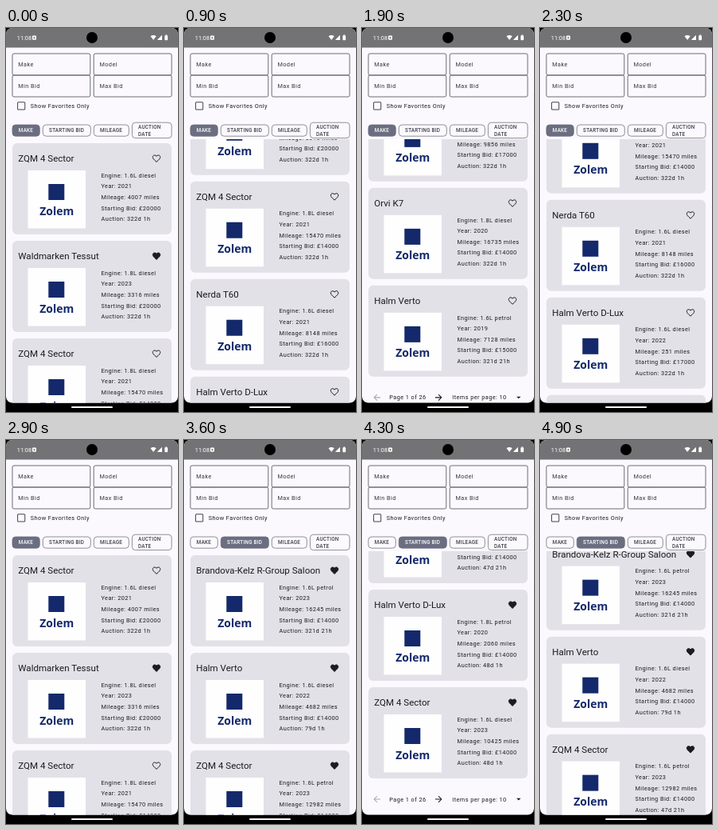
An HTML page for the animation above (5 s loop, 216 by 480 pixels).

```html
<!DOCTYPE html>
<html lang="en">
<head>
<meta charset="utf-8">
<title>Auction list</title>
<style>
html, body { margin: 0; width: 100%; height: 100%; overflow: hidden; background: #000; }
svg { display: block; width: 216px; height: 480px; font: 7.35px Roboto, sans-serif; letter-spacing: .42px; fill: #1c1b20; }
.title { font-size: 11.55px; letter-spacing: 0; }
.brand { font: bold 14px "Open Sans", sans-serif; letter-spacing: 0; fill: #14296b; }
.line { fill: none; stroke: #6c6d76; }
.chip text { font-size: 6.3px; font-weight: 500; letter-spacing: .26px; fill: #3c3d46; }
.chip rect { fill: none; stroke: #74757e; stroke-width: .8; }
.chip.on rect { fill: #6a6e80; stroke: #6a6e80; }
.chip.on text { fill: #fff; }
</style>
</head>
<body>
<svg id="stage" viewBox="0 0 216 480"></svg>
<script>
const PITCH = 122, TOP = 144, END = 933, LOOP = 5000, STEP = 100, SORT_AT = 3200;

// name, engine, year, miles, bid, time left, favourite
const byMake = [
  ["ZQM 4 Sector", "1.6L diesel", 2021, 4007, 20000, "322d 1h"],
  ["Waldmarken Tessut", "1.8L diesel", 2023, 3316, 20000, "322d 1h", 1],
  ["ZQM 4 Sector", "1.8L diesel", 2021, 15470, 14000, "322d 1h"],
  ["Nerda T60", "1.6L diesel", 2021, 8148, 16000, "322d 1h"],
  ["Halm Verto D-Lux", "1.6L diesel", 2022, 251, 17000, "322d 1h"],
  ["Nerda T60", "1.6L petrol", 2020, 6420, 15000, "322d 1h"],
  ["Halm Verto", "1.8L diesel", 2022, 11830, 16000, "322d 1h"],
  ["Waldmarken Tessut", "1.8L petrol", 2023, 9856, 17000, "322d 1h"],
  ["Orvi K7", "1.8L diesel", 2020, 16735, 14000, "322d 1h"],
  ["Halm Verto", "1.6L petrol", 2019, 7128, 15000, "321d 21h"]
];
const byBid = [
  ["Brandova-Kelz R-Group Saloon", "1.6L petrol", 2023, 16245, 14000, "321d 21h", 1],
  ["Halm Verto", "1.6L diesel", 2022, 4682, 14000, "79d 1h", 1],
  ["ZQM 4 Sector", "1.6L petrol", 2023, 12982, 14000, "47d 21h", 1],
  ["Orvi K7", "1.8L diesel", 2021, 9310, 14000, "47d 21h", 1],
  ["Nerda T60", "1.6L diesel", 2022, 5274, 14000, "47d 21h", 1],
  ["Waldmarken Tessut", "1.8L petrol", 2020, 13650, 14000, "47d 21h", 1],
  ["Halm Verto", "1.6L petrol", 2021, 7816, 14000, "47d 21h", 1],
  ["Orvi K7", "1.8L diesel", 2023, 3942, 14000, "47d 21h", 1],
  ["Halm Verto D-Lux", "1.8L petrol", 2020, 2060, 14000, "48d 1h", 1],
  ["ZQM 4 Sector", "1.6L diesel", 2023, 10425, 14000, "48d 1h", 1]
];

const text = (x, y, s, attrs = "") => `<text x="${x}" y="${y}" ${attrs}>${s}</text>`;
const rect = (x, y, w, h, r, attrs = "") =>
  `<rect x="${x}" y="${y}" width="${w}" height="${h}" rx="${r}" ${attrs}/>`;

const heart = full => `<path transform="translate(182.7 12.9) scale(.525)"
  d="M12 20C6.3 14.8 3 11.9 3 8.5C3 6 5 4 7.5 4C9.2 4 11 5 12 6.5C13 5 14.8 4 16.5 4C19 4 21 6 21 8.5C21 11.9 17.7 14.8 12 20Z"
  fill="${full ? "#1c1b20" : "none"}" stroke="#1c1b20" stroke-width="1.9"/>`;

function card([name, engine, year, miles, bid, left, fav], i) {
  const rows = [`Engine: ${engine}`, `Year: ${year}`, `Mileage: ${miles} miles`,
    `Starting Bid: £${bid}`, `Auction: ${left}`];
  return `<g transform="translate(0 ${TOP + i * PITCH})">
    ${rect(8, 0, 200, 114, 6, 'fill="#e2e1e8"')}
    ${text(15.3, 23, name, 'class="title"')}${heart(fav)}
    ${rect(27.5, 34, 72.5, 72.5, 0, 'fill="#fefefe"')}
    ${rect(53.3, 51, 20, 20, 0, 'fill="#14296b"')}
    ${text(63.8, 89.5, "Zolem", 'class="brand" text-anchor="middle"')}
    ${rows.map((s, k) => text(119.5, 42.7 + k * 13.6, s)).join("")}
  </g>`;
}

const arrow = (x, dir, color) => `<path transform="translate(${x} 0) scale(${dir} 1)"
  d="M-4 0H3.6M0 -3.8L3.8 0L0 3.8" fill="none" stroke="${color}" stroke-width="1.05"/>`;

const pager = `<g transform="translate(0 ${449 + END})">
  ${arrow(19, -1, "#a9a8ae")}${text(34.3, 2.6, "Page 1 of 26")}${arrow(96, 1, "#1c1b20")}
  ${text(113.3, 2.6, "Items per page: 10")}<path d="M194 -1.2h5.4l-2.7 2.7z"/></g>`;

const list = (id, cars) => `<g id="${id}">${cars.map(card).join("")}${pager}</g>`;

const field = (x, y, label) =>
  rect(x, y, 97.8, 27, 2, 'class="line"') +
  text(x + 7.2, y + 16.2, label, 'fill="#33343b"');

const chip = (id, x, w, label) =>
  `<g class="chip" id="${id}">${rect(x, 121, w, 14.2, 4)}${text(x + 7.8, 130.4, label)}</g>`;

const statusBar = `<g fill="#fff">
  ${rect(0, 0, 216, 24.5, 0, 'fill="#737375"')}
  ${text(13.8, 14.6, "11:08", 'letter-spacing="0"')}
  ${rect(33, 9.5, 5, 5.2, 1)}${rect(34.5, 11.3, 2, 2, .5, 'fill="#737375"')}
  <circle cx="108" cy="12" r="7" fill="#000"/>
  <path d="M181.5 10.3Q185 7.6 188.7 10.3L185.1 15ZM196 8.8V15H189.8Z"/>
  ${rect(199.3, 9.2, 3.8, 6, .7)}${rect(200.4, 8.4, 1.6, 1, 0)}</g>`;

const $ = id => document.getElementById(id);

$("stage").innerHTML = `
  <clipPath id="screen">${rect(0, 0, 216, 468.5, 8)}</clipPath>
  <clipPath id="view">${rect(0, 139, 216, 330, 0)}</clipPath>
  ${rect(0, 0, 216, 480, 0, 'fill="#000"')}
  <g clip-path="url(#screen)">
    ${rect(0, 0, 216, 480, 0, 'fill="#fbf9fe"')}
    ${statusBar}
    ${field(8, 32, "Make")}${field(110.2, 32, "Model")}
    ${field(8, 59, "Min Bid")}${field(110.2, 59, "Max Bid")}
    ${rect(14.6, 92.8, 9.2, 9.2, 1, 'class="line" stroke-width="1.05" style="stroke:#45464f"')}
    ${text(30.8, 100.1, "Show Favorites Only")}
    ${chip("make", 8, 34.3, "MAKE")}${chip("bid", 46.3, 60, "STARTING BID")}
    ${chip("miles", 110.3, 44, "MILEAGE")}
    <g class="chip">${rect(158.4, 118.2, 49.6, 19.4, 4)}${text(166, 126.1, "AUCTION")}${text(166, 134.5, "DATE")}</g>
    <g clip-path="url(#view)">${list("makeList", byMake)}${list("bidList", byBid)}</g>
  </g>
  ${rect(82, 473.1, 52, 2, 1, 'fill="#fff"')}`;

// smooth 0..1 between two times
function ease(t, from, to) {
  const p = Math.min(1, Math.max(0, (t - from) / (to - from)));
  return p * p * (3 - 2 * p);
}

function draw(now) {
  const t = Math.floor(now % LOOP / STEP) * STEP;
  const sorted = t >= SORT_AT;
  const scroll = END * (ease(t, 650, 1496) - ease(t, 1850, 2570)
    + ease(t, 3650, 4290) - ease(t, 4350, 4953));
  $("make").classList.toggle("on", !sorted);
  $("bid").classList.toggle("on", sorted);
  $("makeList").style.display = sorted ? "none" : "";
  $("bidList").style.display = sorted ? "" : "none";
  $(sorted ? "bidList" : "makeList").setAttribute("transform", `translate(0 ${-scroll.toFixed(2)})`);
}

const start = performance.now();
function tick() {
  draw(performance.now() - start);
  requestAnimationFrame(tick);
}
tick();
</script>
</body>
</html>
```
